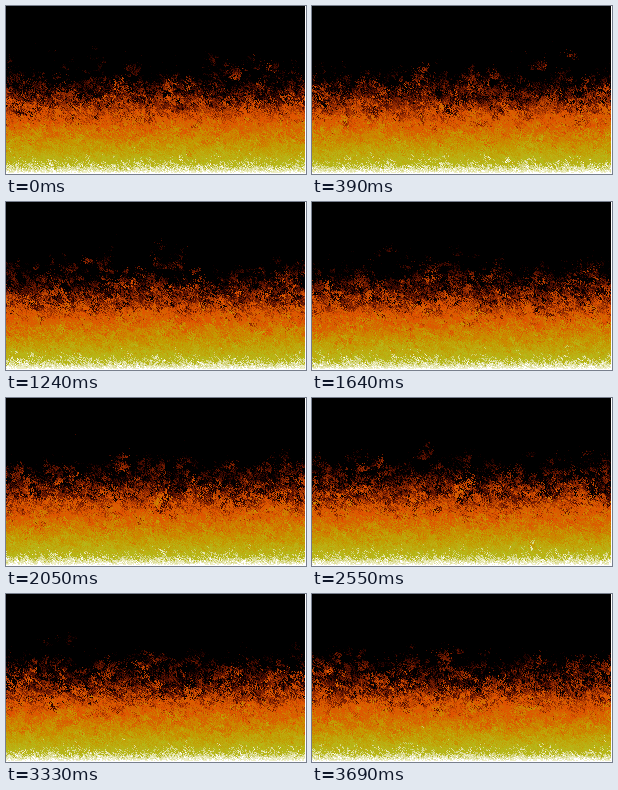
An HTML page with a canvas for the animation above (3.71 s loop, 300 by 168 pixels).

```html
<!DOCTYPE html>
<html lang="en">
<head>
<meta charset="utf-8">
<title>Fire</title>
<style>
html, body { margin: 0; width: 100%; height: 100%; overflow: hidden; background: #000; }
canvas { display: block; width: 300px; height: 168px; image-rendering: pixelated; }
</style>
</head>
<body>
<canvas width="300" height="168"></canvas>
<script>
const W = 300, H = 168, FIRE_W = 299;
const LOOP = 3710, WARM_UP = 300;

// Runs of evenly spaced steps: first ms, last ms, number of steps
const RUNS = [
  [30, 530, 15], [570, 1070, 15], [1100, 1610, 15], [1640, 2150, 16],
  [2190, 2690, 16], [2720, 3230, 16], [3260, 3690, 14]
];
const FRAMES = 1 + RUNS.reduce((sum, run) => sum + run[2], 0);

// Heat ramp from cold to white hot
const RAMP = (
  '000000 0f0000 240400 400a00 520f00 671700 771f00 8f2700 9f2f00 af3f00 ' +
  'bf4700 c74700 df4f00 df5700 df5700 d75f00 d75f00 d76700 cf6f00 cf7700 ' +
  'cf7f00 cf8700 c78700 c78f00 c79700 bf9f04 bf9f04 bfa70c bfa70c bfaf14 ' +
  'b7af14 b7b714 b7b71c cfcf6f dfdf9f efefc7 ffffff'
).split(' ').map(hex => {
  const rgb = parseInt(hex, 16);
  return (0xff000000 | (rgb & 255) << 16 | (rgb & 0xff00) | rgb >> 16) >>> 0;
});
const HOTTEST = RAMP.length - 1;

let seed = 20731;
function random() {
  seed ^= seed << 13;
  seed ^= seed >>> 17;
  seed ^= seed << 5;
  return (seed >>> 0) / 4294967296;
}

const heat = new Uint8Array(FIRE_W * H);
heat.fill(HOTTEST, FIRE_W * (H - 1));

// Each cell passes its heat up one row with a sideways drift; odd drifts cool it
function spread(from) {
  const value = heat[from], above = from - FIRE_W;
  if (!value) {
    heat[above] = 0;
    return;
  }
  const drift = Math.round(random() * 3);
  heat[Math.max(0, above - drift + 1)] = value - (drift & 1);
}

function burn() {
  for (let x = 0; x < FIRE_W; x++) {
    for (let y = 1; y < H; y++) spread(y * FIRE_W + x);
  }
}

for (let i = 0; i < WARM_UP; i++) burn();
const frames = Array.from({ length: FRAMES }, () => {
  burn();
  return heat.slice();
});

const ctx = document.querySelector('canvas').getContext('2d');
const image = ctx.createImageData(W, H);
const pixels = new Uint32Array(image.data.buffer).fill(0xffffffff);

function frameAt(ms) {
  let index = 0;
  for (const [first, last, steps] of RUNS) {
    if (ms < first) break;
    const passed = Math.floor((ms - first) / (last - first) * (steps - 1));
    index += Math.min(steps, passed + 1);
  }
  return index;
}

let shown = -1;
function draw() {
  const index = frameAt(performance.now() % LOOP);
  if (index !== shown) {
    shown = index;
    const cells = frames[index];
    for (let y = 0, i = 0; y < H; y++) {
      for (let x = 0; x < FIRE_W; x++) pixels[y * W + x] = RAMP[cells[i++]];
    }
    ctx.putImageData(image, 0, 0);
  }
  requestAnimationFrame(draw);
}
draw();
</script>
</body>
</html>
```
